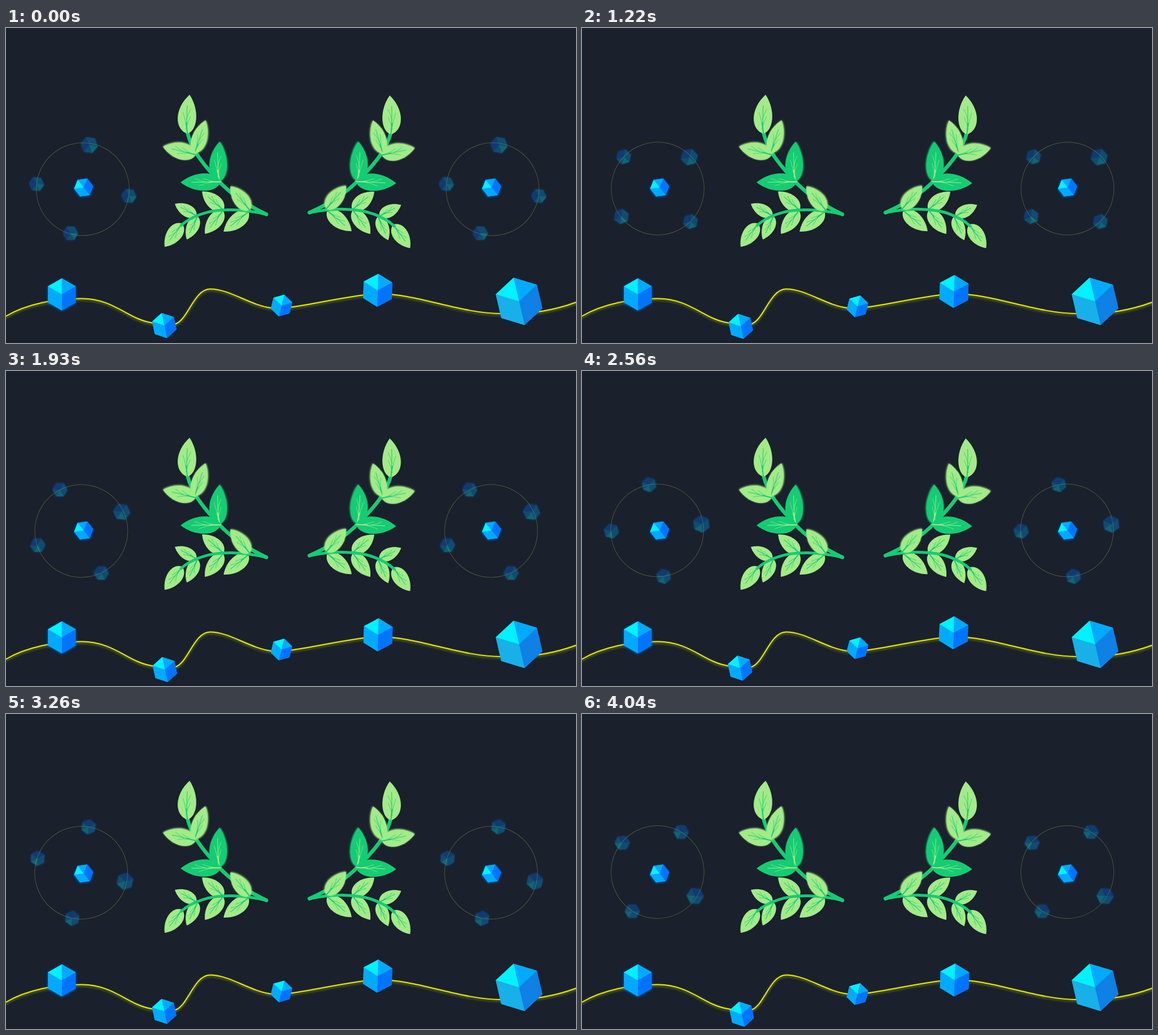
Recreate the animation shown at these times as an HTML page. Size 1006x557 px, loop 4100 ms.

```html
<!DOCTYPE html>
<html lang="en">
<head>
<meta charset="utf-8">
<title>Laurel and cubes</title>
<style>
  html, body { margin: 0; width: 100%; height: 100%; overflow: hidden; background: #1a202c; }
  svg { display: block; }
  .wave { fill: none; stroke: #eaf204; stroke-width: 2; filter: drop-shadow(0 2px 2px rgba(225, 235, 0, .6)); }
  .ring { fill: none; stroke: #e6e64a; stroke-opacity: .27; }
  .dim { opacity: .32; filter: blur(.5px) drop-shadow(0 0 2px #0074ff); }
  .lit { filter: drop-shadow(0 1px 2px rgba(0, 116, 255, .8)); }
  .stem { fill: none; stroke: #14cc74; stroke-linecap: round; }
  .glow { filter: drop-shadow(0 1px 1.5px currentColor); }
  .vein { fill: none; stroke-linecap: round; }
</style>
</head>
<body>
<svg id="stage" width="1006" height="557" viewBox="0 0 1006 557"></svg>
<script>
const LOOP = 4100;
const LIGHT = '#a2eb88', GREEN = '#14cc74';
const CYAN = '#00f2ff', SKY = '#00aaff', BLUE = '#0074ff';
const stage = document.getElementById('stage');

// Hexagonal cube: the top face is split into a bright and a plain half.
function cube(x, y, r, turn, cls = '', left = SKY, right = BLUE) {
  const corner = i => {
    const a = (turn - 90 + i * 60) * Math.PI / 180;
    return `${(x + r * Math.cos(a)).toFixed(2)},${(y + r * Math.sin(a)).toFixed(2)}`;
  };
  const face = (fill, ...ids) =>
    `<polygon fill="${fill}" points="${ids.map(corner).join(' ')} ${x},${y}"/>`;
  const hull = [0, 1, 2, 3, 4, 5].map(corner).join(' ');
  return `<g class="${cls}"><polygon fill="${left}" points="${hull}"/>` +
    face(SKY, 0, 1) + face(right, 1, 2, 3) + face(left, 3, 4, 5) + face(CYAN, 5, 0) + '</g>';
}

// Leaf from its base to its tip, w pixels wide, its belly pushed sideways by bend.
function leaf([bx, by, tx, ty, w, bend = 0], fill = LIGHT, cls = '') {
  const len = Math.hypot(tx - bx, ty - by);
  const turn = Math.atan2(ty - by, tx - bx) * 180 / Math.PI;
  const p = (x, y) => `${(x * len).toFixed(1)} ${(y * w + bend).toFixed(1)}`;
  const tip = `${len.toFixed(1)} 0`;
  const side = (at, to, s) => `M${p(at, 0)}Q${p((at + to) / 2, s * .06)} ${p(to, s * .2)}`;
  const veins = side(.12, .44, 1) + side(.2, .54, -1) + side(.36, .64, 1);
  const ink = fill === LIGHT ? GREEN : LIGHT;
  return `<g class="${cls}" color="${fill}" transform="translate(${bx} ${by}) rotate(${turn.toFixed(2)})">
    <path fill="${fill}" d="M0 0C${p(.1, -.64)} ${p(.63, -.68)} ${tip}C${p(.63, .68)} ${p(.1, .64)} 0 0"/>
    <g class="vein" stroke="${ink}"><path stroke-width=".7" d="${veins}"/>
    <path stroke-width="1" d="M0 0Q${p(.3, 0)} ${p(.72, 0)}"/>
    <path stroke-width="1.8" d="M0 0L${p(.28, 0)}"/></g></g>`;
}

function branch() {
  const lower = [
    [384, 322, 346, 289, 26], [336, 332, 298, 311, 22], [428, 325, 384, 360, 27],
    [383, 323, 351, 364, 26], [338, 333, 319, 374, 22], [311, 346, 280, 387, 27]
  ];
  return lower.map(l => leaf(l)).join('') +
    `<path class="stem" stroke-width="5" d="M459 329.5C420 320 375 318 345 329C330 334 318 341 309 349"/>
     <path class="stem" stroke-width="6.5" d="M459.5 329.5C425 313 395 292 375 270C347 240 327 215 320 184"/>` +
    leaf([320, 187, 324, 118, 33, -3]) +
    leaf([333, 221, 352, 163, 27], LIGHT, 'glow') +
    leaf([335, 224, 277, 210, 30], LIGHT, 'glow') +
    leaf([377, 271, 377, 201, 31, -3.5], GREEN, 'glow') +
    leaf([379, 272, 308, 273, 31], GREEN) +
    leaf([430, 322, 396, 280, 27], LIGHT, 'glow');
}

const orbit = x => `<g transform="translate(${x} 0)"><g class="orbit">
  <circle class="ring" cx="135.5" cy="285" r="82"/>` +
  cube(147, 207, 15, 160, 'dim') + cube(54, 276, 13.2, 155, 'dim') +
  cube(114, 363, 13.2, 150, 'dim') + cube(217, 297, 13.2, 155, 'dim') + '</g></g>';

// x, y, radius, turn, horizontal and vertical drop
const floaters = [
  [279, 525.3, 22.6, -12, 3.9, 7.2],
  [486.3, 490.1, 19.8, 14, -.2, 6.7],
  [655.8, 462.8, 29.2, 2, 2.3, 10]
];

stage.innerHTML = orbit(0) + orbit(723.3) +
  cube(137, 282, 17, -38, 'lit') + cube(857, 282, 17, -38, 'lit') +
  `<g id="branch">${branch()}</g>
  <use href="#branch" transform="translate(535 326) rotate(1.7) scale(-1 1) translate(-460 -329)"/>
  <path class="wave" d="M-4 512L0 509.5C36 488 88 478 135 478.5C190 479 215 514 256 521C273 524 287 526 300 523C322 514 332 462 360 461.5C395 461.5 430 490 468 495C502 500 600 472 655 470C725 469 800 505 875 505C920 507 965 500 1006 485L1012 483"/>` +
  cube(98.5, 471, 28.3, 0, 'lit') +
  floaters.map(([x, y, r, turn]) => `<g class="float">${cube(x, y, r, turn)}</g>`).join('') +
  cube(905.5, 483.3, 43, -13, '', '#18b0e8', '#0e80e6');

const orbits = [...document.querySelectorAll('.orbit')];
const floats = [...document.querySelectorAll('.float')];

function pose(ms) {
  const t = ms < 670 ? ms * 790 / 670 - 120 : ms;   // a slightly hurried start
  const angle = 21.7 + (t - 670) * .02745;
  orbits.forEach(o => o.setAttribute('transform', `rotate(${angle} 136.2 281.5)`));

  // Cubes sink and rise, easing out on the way up.
  const half = 1170;
  const d = (t - 1600 + 4 * half) % (2 * half);
  const drop = (1 - Math.min(d, 2 * half - d) / half) ** 3;
  floats.forEach((f, i) => {
    const [, , , , dx, dy] = floaters[i];
    f.setAttribute('transform', `translate(${dx * drop} ${dy * drop})`);
  });
}

const start = performance.now();
function tick() {
  pose((performance.now() - start) % LOOP);
  requestAnimationFrame(tick);
}
tick();
</script>
</body>
</html>
```
